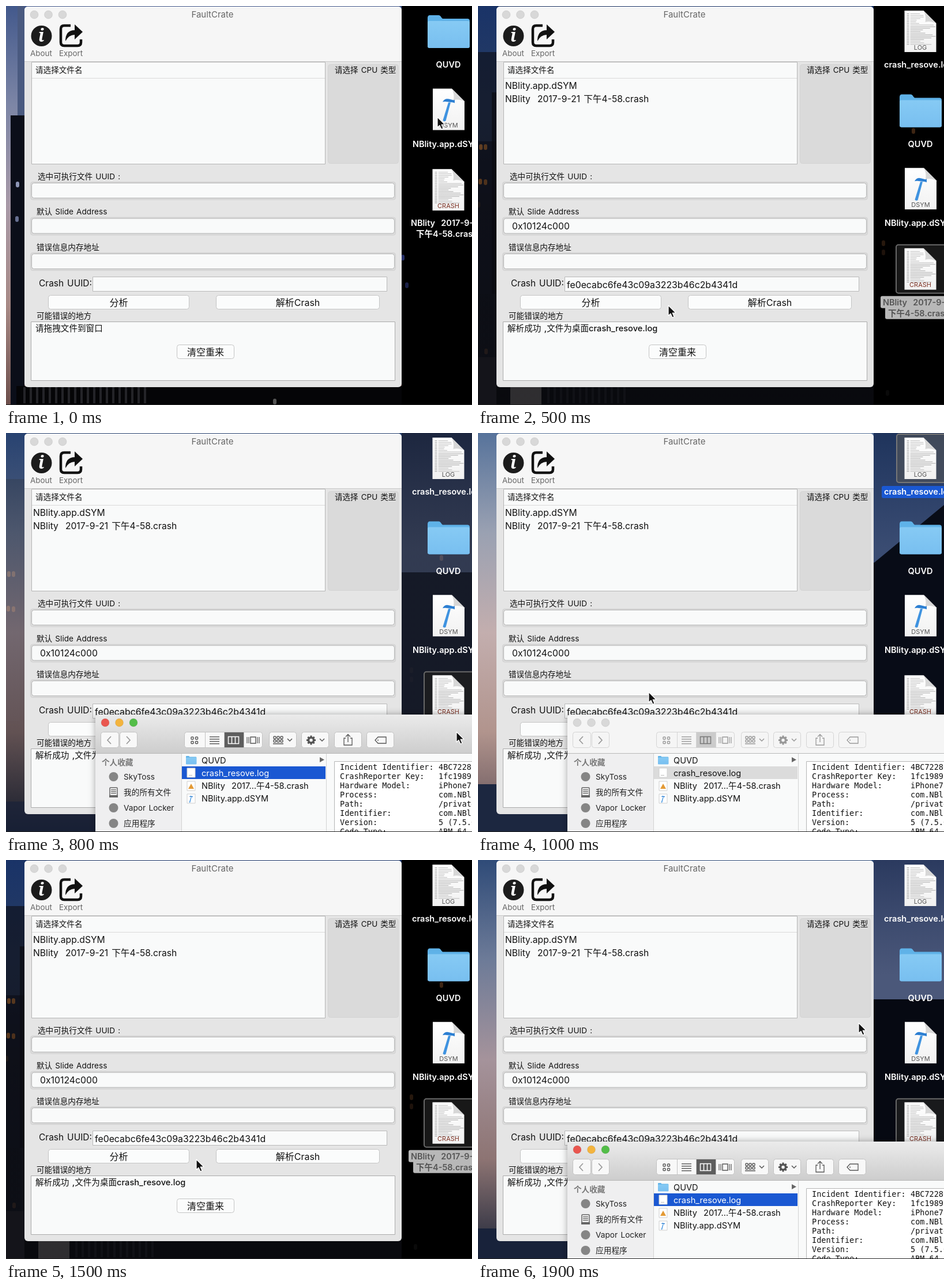
An HTML page with a canvas that plays this animation: 808x693 px, repeating every 2 s.

```html
<!DOCTYPE html>
<html lang="zh">
<head>
<meta charset="utf-8">
<style>
  html, body { margin: 0; width: 100%; height: 100%; overflow: hidden; background: #000; }
  canvas { display: block; }
</style>
</head>
<body>
<canvas id="stage" width="808" height="693"></canvas>
<script>
const W = 808, H = 693, STEP = 100, STEPS = 20;
const ctx = document.getElementById('stage').getContext('2d');
const SANS = 'Inter, "Noto Sans CJK SC", "Noto Sans CJK", sans-serif';
const MONO = '"DejaVu Sans Mono", monospace';
const FIELD = '#f9fafa', BLUE = '#1a58d2';

// ---- drawing helpers ----
function box(x, y, w, h, fill, { r = 0, stroke, lw = 1 } = {}) {
  ctx.beginPath();
  ctx.roundRect(x, y, w, h, r);
  if (fill) { ctx.fillStyle = fill; ctx.fill(); }
  if (stroke) { ctx.strokeStyle = stroke; ctx.lineWidth = lw; ctx.stroke(); }
}

function disc(x, y, r, fill, stroke) {
  box(x - r, y - r, 2 * r, 2 * r, fill, { r, stroke });
}

function shape(d, fill, stroke, lw = 1) {
  const path = new Path2D(d);
  if (fill) { ctx.fillStyle = fill; ctx.fill(path); }
  if (stroke) { ctx.strokeStyle = stroke; ctx.lineWidth = lw; ctx.stroke(path); }
}

// y is the vertical centre of the capitals
function text(str, x, y, size, { color = '#111', weight = 400, align = 'left', font = SANS } = {}) {
  ctx.font = `${weight} ${size}px ${font}`;
  ctx.wordSpacing = font === SANS ? `${size * 0.1}px` : '0px';
  ctx.textAlign = align;
  ctx.fillStyle = color;
  ctx.fillText(str, x, y + size * 0.365);
}

function at(x, y, scale, draw) {
  ctx.save();
  ctx.translate(x, y);
  ctx.scale(scale, scale);
  draw();
  ctx.restore();
}

function vertical(y0, y1, colors) {
  const g = ctx.createLinearGradient(0, y0, 0, y1);
  colors.forEach((c, i) => g.addColorStop(i / (colors.length - 1), c));
  return g;
}

// ---- wallpaper ----
const scenes = {
  street: {
    left: ['#43598c', '#7d86a6', '#a99aa8', '#a88a86', '#6d4f4c'],
    right: ['#000', '#000'],
    blocks: [[20, 0, 12, 200, '#4a5a80'], [8, 190, 24, 503, '#0b0e19'], [18, 660, 668, 33, '#050507']],
    ribs: [30, 250, '#242428'],
    lights: [[20, 310, '#8d95b5'], [19, 370, '#666f90'], [688, 437, '#27306a'], [695, 485, '#1b2148'], [466, 687, '#555']]
  },
  tower: {
    left: ['#17346f', '#4f73ab', '#5f7fae', '#15171f', '#15171f'],
    right: ['#000', '#000'],
    blocks: [[0, 235, 32, 458, '#10131c'], [0, 660, 686, 33, '#050506'], [0, 610, 32, 83, '#26242a'], [56, 662, 54, 31, '#77716d']],
    ribs: [120, 260, '#1b1b1e'],
    lights: [[1, 345, '#a8641f'], [14, 600, '#4a3327'], [710, 672, '#1d1d1d']]
  },
  night: {
    left: ['#1b3364', '#14213f', '#0d1018', '#0b0c12', '#0b0c12'],
    right: ['#000', '#000'],
    blocks: [[0, 80, 32, 420, '#0e1018'], [24, 150, 8, 350, '#090a10'], [0, 0, 245, 1, '#1c3260']],
    ribs: [0, 0, '#000'],
    lights: [[5, 245, '#8a5424'], [13, 245, '#7a4a20'], [4, 305, '#7f4d20'], [13, 306, '#6d421d'], [755, 217, '#5d371c'], [703, 412, '#3b2414'], [703, 428, '#2d1b10']]
  },
  dusk: {
    left: ['#2f4b78', '#6d7b98', '#a5939b', '#8d7473', '#1b2437'],
    right: ['#2b3a5f', '#3c4a6e', '#4b587a', '#4b587a'],
    blocks: [[686, 242, 122, 451, '#060912'], [0, 640, 686, 53, '#18223a']],
    ribs: [0, 0, '#000'],
    lights: []
  },
  dawn: {
    left: ['#57739b', '#9aa1b2', '#c3aeae', '#b1948d', '#5c4d55'],
    right: ['#1f345c', '#2c4068', '#3a4c72', '#3a4c72'],
    blocks: [[686, 225, 122, 468, '#080c17'], [0, 610, 686, 83, '#1c2740']],
    roof: 'M686 226L808 125V240H686Z',
    ribs: [0, 0, '#000'],
    lights: []
  }
};

function drawScene({ left, right, blocks, roof, ribs, lights }) {
  box(0, 0, 686, H, vertical(0, H, left));
  box(686, 0, 122, H, vertical(0, 300, right));
  for (const [x, y, w, h, c] of blocks) box(x, y, w, h, c);
  if (roof) shape(roof, '#080c17');
  for (let x = ribs[0]; x < ribs[1]; x += 11) box(x, 662, 4, 28, ribs[2]);
  for (const [x, y, c] of lights) box(x - 3, y - 5, 6, 10, c, { r: 3 });
}

const sceneKeys = [[0, 'street'], [3, 'tower'], [6, 'night'], [9, 'dusk'], [10, 'dawn'],
                   [13, 'tower'], [16, 'night'], [19, 'dusk']];

function wallpaper(step) {
  const i = sceneKeys.findLastIndex(([s]) => s <= step);
  const [from, name] = sceneKeys[i];
  drawScene(scenes[name]);
  if (step === from) return;
  const [to, next] = sceneKeys[i + 1];
  ctx.globalAlpha = (step - from) / (to - from);
  drawScene(scenes[next]);
  ctx.globalAlpha = 1;
}

// ---- desktop icons ----
function folder() {
  shape('M0 5Q0 0 4 0H19Q22 0 24 4L26 6H69Q73 6 73 10V53Q73 57 69 57H4Q0 57 0 53Z', '#5fb2e8');
  box(0, 10, 73, 47, vertical(10, 57, ['#86caf4', '#78bff0']), { r: 3 });
}

function hammer() {
  shape('M17.5 55L27 24H31L22.5 56Q19 58 17.5 55Z', '#3f93e0');
  shape('M17 23Q21 16 28 18L36 20L38 18V25L35 24L26 23Q21 22 17 23Z', '#2c7fd2');
}

function documentIcon(kind) {
  shape('M0 0H33L55 22V72H0Z', vertical(0, 72, ['#fff', '#f1f1f1']));
  if (kind === 'DSYM') hammer();
  else {
    for (let i = 0; i < 20; i++) {
      const y = 5 + i * 2.8, width = (y < 22 ? 24 : 44) * (0.7 + 0.3 * Math.sin(i * 7.3));
      box(4, y, 4, 1, '#999');
      box(10, y, width, 1, i > 7 && i < 17 ? '#aaa' : '#bbb');
    }
  }
  shape('M33 0L55 22Q43 17 36 20Q38 9 33 0Z', '#d7d7d7');
  text(kind, 27.5, 63.5, 11, { align: 'center', color: kind === 'CRASH' ? '#7c3022' : '#555' });
}

function iconLabel(str, x, y, { color = '#fff', align = 'left' } = {}) {
  text(str, x, y, 14.5, { weight: 600, color, align });
}

function desktop({ hasLog, crashBox, crashLabel, logSelected }) {
  const pitch = 137.6;
  let top = 6;
  if (hasLog) {
    if (logSelected) {
      box(726, 2, 100, 84, 'rgba(75,80,90,.75)', { r: 4, stroke: '#777', lw: 2 });
      box(700, 92, 120, 21, BLUE, { r: 3 });
    }
    at(739.5, 8, 1, () => documentIcon('LOG'));
    iconLabel('crash_resove.log', 704, 102);
    top += pitch;
  }
  at(731, top + 10, 1, folder);
  iconLabel('QUVD', 767, top + 96, { align: 'center' });
  top += pitch;
  at(740, top, 1, () => documentIcon('DSYM'));
  iconLabel('NBlity.app.dSYM', 705, top + 96);
  top += pitch;
  if (crashBox) box(725, top - 4, 100, 84, 'rgba(30,30,30,.8)', { r: 4, stroke: '#686868', lw: 2 });
  at(739.5, top + 2, 1, () => documentIcon('CRASH'));
  if (crashLabel) {
    box(698, top + 85, 130, 21, '#b8b8b8', { r: 3 });
    box(706, top + 103, 120, 22, '#b8b8b8', { r: 3 });
  }
  const color = crashLabel ? '#555' : '#fff';
  iconLabel('NBlity  2017-9-21', 702, top + 96, { color });
  iconLabel('下午4-58.crash', 711, top + 115, { color });
}

// ---- main window ----
function trafficLights(x, y, colors = ['#d8d8d8', '#d8d8d8', '#d8d8d8']) {
  colors.forEach((c, i) => disc(x + i * 24.5, y, 7, c, 'rgba(0,0,0,.08)'));
}

function button(x, y, w, label) {
  box(x + .5, y + .5, w - 1, 24, '#fbfcfc', { r: 4, stroke: '#c4c4c4' });
  text(label, x + w / 2, y + 13, 16, { align: 'center' });
}

function field(label, labelX, y, value = '') {
  text(label, labelX, y - 25, 13.6);
  box(42.5, y - 15.5, 633, 31, '#dcdcdc', { r: 4, stroke: '#d0d0d0' });
  box(44.5, y - 13.5, 629, 26, FIELD, { r: 4, stroke: '#b2b2b2' });
  text(value, 59, y, 15.8);
}

function toolWindow({ files, ready, message }) {
  box(32, 1, 654, 661, '#e5e5e5', { r: 6 });
  box(32, 1, 654, 95, '#f6f6f6', { r: [6, 6, 0, 0] });
  box(32, 96, 654, 1, '#c9c9c9');
  trafficLights(49, 15);
  text('FaultCrate', 358, 15, 15, { align: 'center', color: '#666' });

  disc(61.5, 52, 18, '#1c1c1c');
  text('i', 61, 51.5, 30, { align: 'center', color: '#fff', weight: 'italic 700', font: '"Noto Serif", serif' });
  shape('M112 34H101Q95 34 95 40V63Q95 69 101 69H124Q130 69 130 63V58', null, '#111', 4.5);
  shape('M103 61Q103 42 119 42V32L133 45L119 58V50Q109 50 103 61Z', '#111');
  text('About', 61, 82.5, 13.4, { align: 'center', color: '#666' });
  text('Export', 112.5, 82.5, 13.4, { align: 'center', color: '#666' });

  box(44.5, 97.5, 509, 177, FIELD, { stroke: '#b4b4b4' });
  box(45, 125, 508, 1, '#dadada');
  text('请选择文件名', 51, 111, 13.6);
  files.forEach((name, i) => text(name, 47, 138 + i * 23.3, 15.7));
  box(558.5, 101.5, 122, 172, '#dadada', { r: 4, stroke: '#d3d3d3' });
  text('请选择 CPU 类型', 570, 111, 13.5);

  field('选中可执行文件 UUID :', 55, 321);
  field('默认 Slide Address', 53, 382.5, ready ? '0x10124c000' : '');
  field('错误信息内存地址', 53, 444);

  text('Crash UUID:', 57, 481, 15.5);
  box(150.5, 470.5, 510, 25, FIELD, { stroke: '#b9b9b9' });
  if (ready) text('fe0ecabc6fe43c09a3223b46c2b4341d', 154, 484, 15.85);
  button(73, 502, 245, '分析');
  button(364, 502, 284, '解析Crash');
  text('可能错误的地方', 53, 538, 13.6);
  box(43.5, 548.5, 631, 102, FIELD, { stroke: '#aaa' });
  text(message, 51, 560, 14.6, { weight: 500 });
  button(296, 588, 100, '清空重来');
}

// ---- file browser ----
const report = [
  ['Incident Identifier:', '4BC72280-1A6D'], ['CrashReporter Key:', '1fc1989f03'],
  ['Hardware Model:', 'iPhone7,1'], ['Process:', 'com.NBlity'], ['Path:', '/private/var'],
  ['Identifier:', 'com.NBlity'], ['Version:', '5 (7.5.0)'], ['Code Type:', 'ARM-64']
];

function smallDocument(x, y, mark) {
  box(x - 7, y - 8, 14, 16, '#fff', { stroke: '#cfcfcf' });
  if (mark === 'crash') shape(`M${x} ${y - 4}l5 9h-10z`, '#e39a35');
  if (mark === 'dsym') at(x - 8.5, y - 10, .3, hammer);
  if (mark === 'log') box(x - 4, y + 4, 6, 1, '#bbb');
}

function toolbar(active) {
  const ink = active ? '#555' : '#999';
  const edge = active ? '#c2c2c2' : '#d4d4d4';
  const tool = (x, w) => box(x + .5, 30.5, w - 1, 27, active ? '#f8f8f8' : '#f5f5f5', { r: 4, stroke: edge });
  const chevron = x => shape(`M${x - 4} 42l4 4l4 -4`, null, ink, 1.5);
  const dots = (x, y, cols, pitch, size) => {
    for (let i = 0; i < cols * 2; i++)
      box(x + (i % cols) * pitch, y + Math.floor(i / cols) * pitch, size, size, null, { r: 1, stroke: ink, lw: 1.4 });
  };
  [[9, 32], [42, 31], [154, 136], [301, 48], [357, 48], [414, 48], [470, 48]].forEach(([x, w]) => tool(x, w));
  shape('M27 38l-6 6.5l6 6.5M54 38l6 6.5l-6 6.5', null, '#999', 1.7);
  box(223, 31, 34, 26, active ? '#5e5e5e' : '#cbcbcb');
  [190, 223, 257].forEach(x => box(x, 31, 1, 26, edge));
  dots(166, 39, 2, 7.5, 4);
  for (let i = 0; i < 4; i++) box(198, 38 + i * 4, 17, 1.4, ink);
  const viewInk = active ? '#fff' : '#777';
  box(230.5, 38.5, 18, 12, null, { stroke: viewInk, lw: 1.5 });
  shape('M236.5 38v13M242.5 38v13', null, viewInk, 1.5);
  box(269, 39, 9, 11, null, { stroke: ink, lw: 1.4 });
  shape('M263 39v11M266 39v11M281 39v11M284 39v11', null, ink, 1.2);
  dots(309, 38, 3, 6, 4);
  box(308, 50, 18, 1.5, ink);
  chevron(337);
  for (let i = 0; i < 8; i++) {
    const a = i * Math.PI / 4, c = Math.cos(a), s = Math.sin(a);
    shape(`M${374 + 4 * c} ${44.5 + 4 * s}L${374 + 8 * c} ${44.5 + 8 * s}`, null, ink, 3);
  }
  ctx.beginPath();
  ctx.arc(374, 44.5, 4.5, 0, 7);
  ctx.lineWidth = 3.5;
  ctx.stroke();
  chevron(393);
  shape('M434 41h-3v12h14v-12h-3M438 48v-13M434 38.5l4 -4l4 4', null, ink, 1.3);
  shape('M485 44.5l5 -5.5h14v11h-14z', null, ink, 1.3);
  disc(490, 44.5, 1, ink);
}

function browser({ x, y, active, picked }) {
  at(x, y, 1, () => {
    ctx.shadowColor = 'rgba(0,0,0,.35)';
    ctx.shadowBlur = 12;
    box(0, 0, 1490, 400, '#f9fafa', { r: 6 });
    ctx.shadowColor = 'transparent';
    box(0, 0, 1490, 67, active ? vertical(0, 67, ['#ebebeb', '#cdcdcd']) : '#f5f5f5', { r: [6, 6, 0, 0] });
    box(0, 67, 1490, 1, '#b8b8b8');
    trafficLights(17, 14, active ? ['#e9564f', '#f3b43e', '#53bd48'] : undefined);
    toolbar(active);

    at(683, 7, .25, folder);
    box(688, 12, 8, 6, null, { stroke: '#3a8cc9' });
    text('Desktop', 707, 14.5, 15.5);
    box(1088, 31, 377, 27, '#f8f9f9', { r: 4, stroke: '#cfcfcf' });
    disc(1256, 43.5, 5.5, null, '#777');
    shape('M1260 48l5 5', null, '#777', 1.6);
    text('搜索', 1272, 45, 16, { color: '#777' });

    box(0, 68, 149, 332, '#efeff0');
    box(149, 68, 1, 332, '#d2d2d2');
    box(400, 68, 1, 332, '#d2d2d2');
    text('个人收藏', 11, 83, 13.6, { weight: 600, color: '#777' });
    ['SkyToss', '我的所有文件', 'Vapor Locker', '应用程序'].forEach((name, i) => {
      const rowY = 108 + i * 27;
      if (i === 1) {
        box(25, rowY - 8, 13, 16, '#efefef', { r: 1, stroke: '#666', lw: 1.5 });
        for (let k = 0; k < 3; k++) box(27, rowY - 5 + k * 3, 9, 1.3, '#666');
        box(24, rowY + 5, 15, 4, '#666');
      } else disc(31.5, rowY, 8, '#858585');
      text(name, 49, rowY, 13.7, { color: '#222' });
    });

    if (picked) box(150, 90, 249, 22, active ? BLUE : '#dbdbdb');
    at(157, 72, .25, folder);
    shape('M389 74l8 4.5l-8 4.5z', '#666');
    smallDocument(166, 101, 'log');
    smallDocument(166, 124, 'crash');
    smallDocument(166, 146, 'dsym');
    ['QUVD', 'crash_resove.log', 'NBlity  2017…午4-58.crash', 'NBlity.app.dSYM'].forEach((name, i) =>
      text(name, 184, 79.5 + i * 22.2, 14.6, { color: i === 1 && picked && active ? '#fff' : '#111' }));

    if (picked) {
      box(414.5, 81.5, 900, 320, '#fff', { stroke: '#b5b5b5' });
      report.forEach(([key, value], i) => {
        text(key, 424, 91.5 + i * 16, 13.5, { font: MONO });
        text(value, 595, 91.5 + i * 16, 13.5, { font: MONO });
      });
    }
  });
}

function pointer([x, y]) {
  at(x, y, 1, () => {
    ctx.lineJoin = 'round';
    shape('M0 0V18L4 14.3L7 21L10 19.7L7.2 13H13Z', '#111', '#fff', 1.2);
  });
}

// ---- timeline ----
const FILES = ['NBlity.app.dSYM', 'NBlity  2017-9-21 下午4-58.crash'];
const pointerStops = [[748, 193], [765, 310], [300, 220], [497, 513], [497, 513],
                      [330, 520], [151, 525], [511, 522], [781, 519], [660, 283]];
const browserX = { 6: -650, 7: -290 };

function draw(step) {
  const finished = step === 10;
  const phase = finished ? 10 : step % 10;
  const done = phase >= 4;

  wallpaper(step);
  desktop({
    hasLog: done,
    logSelected: finished,
    crashBox: phase >= 2 && !finished,
    crashLabel: phase >= 2 && phase < 6
  });
  toolWindow({
    files: FILES.slice(0, Math.min(phase, 2)),
    ready: phase >= 2,
    message: done ? '解析成功 ,文件为桌面crash_resove.log' : '请拖拽文件到窗口'
  });
  if (phase >= 6) {
    browser({ x: browserX[phase] ?? 155, y: phase === 6 ? 495 : 489, active: !finished, picked: phase >= 8 });
  }
  pointer(finished ? [296, 450] : pointerStops[phase]);
  box(0, 692, W, 1, '#222');
}

let shown = -1;
function tick() {
  const step = Math.floor(performance.now() / STEP) % STEPS;
  if (step !== shown) draw(shown = step);
  requestAnimationFrame(tick);
}
tick();
</script>
</body>
</html>
```
